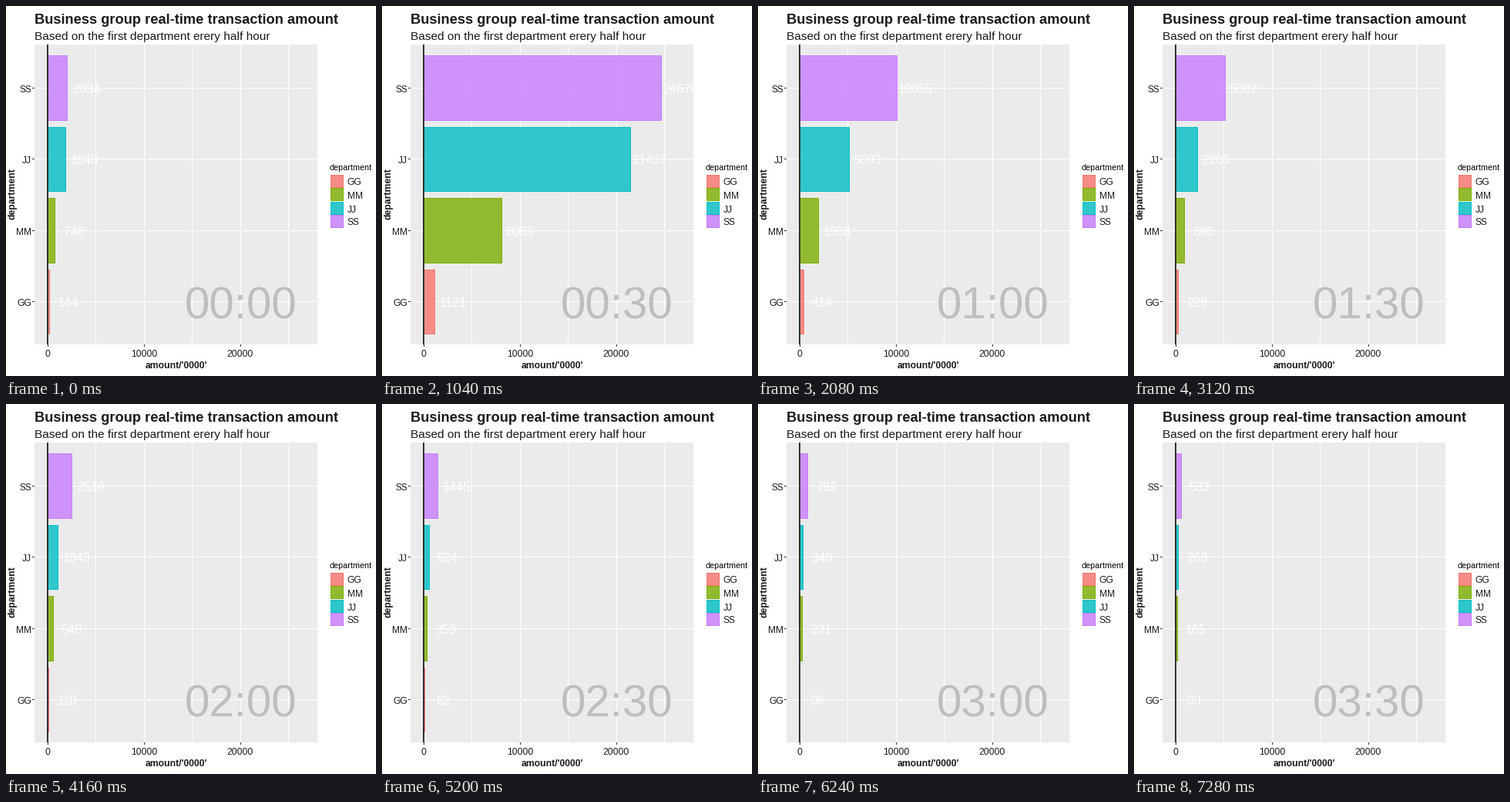
Write a matplotlib script that moves like this. It is 480 by 480 pixels and loops after 8000 ms.

```python
import matplotlib.pyplot as plt
from matplotlib.animation import FuncAnimation
from matplotlib.colors import to_rgba
from matplotlib.patches import Rectangle

SIZE = 480
STEP_MS, HOLD = 80, 13          # every half hour stays for 13 ticks
FRAMES = 100
LEFT, TOP, RIGHT, BOTTOM = 37, 50, 404, 439
ZERO, UNIT = 54, 0.0125         # pixel of value 0, pixels per value
INK = "#1a1a1a"

NAMES = ["SS", "JJ", "MM", "GG"]
COLORS = ["#C77CFF", "#00BFC4", "#7CAE00", "#F8766D"]
ROWS = [106.4, 198.9, 291.4, 383.9]
HALF_BAR = 41.65
AMOUNTS = [
    (2034, 1848, 740, 144),
    (24676, 21437, 8059, 1121),
    (10055, 5093, 1938, 414),
    (5082, 2205, 896, 226),
    (2516, 1043, 548, 110),
    (1445, 524, 359, 82),
    (792, 348, 231, 36),
    (533, 263, 165, 33),
]

plt.rcParams["font.family"] = "Liberation Sans"
fig = plt.figure(figsize=(SIZE / 72, SIZE / 72), dpi=72, facecolor="white")
ax = fig.add_axes([0, 0, 1, 1])
ax.set_xlim(0, SIZE)
ax.set_ylim(SIZE, 0)
ax.axis("off")


def box(x0, y0, x1, y1, color, z=1):
    patch = Rectangle((x0, y0), x1 - x0, y1 - y0, fc=color, lw=0, zorder=z)
    return ax.add_patch(patch)


def tile(x0, y0, x1, y1, color, z=3):
    """Translucent fill with a solid border on the given pixel rows."""
    patch = Rectangle((x0 + 0.5, y0 + 0.5), x1 - x0, y1 - y0,
                      fc=to_rgba(color, 0.8), ec=color, lw=1,
                      joinstyle="miter", snap=False, zorder=z)
    return ax.add_patch(patch)


def text(x, y, s, size, color=INK, **kw):
    kw.setdefault("va", "baseline")
    return ax.text(x, y, s, fontsize=size, color=color, **kw)


# panel, grid and axes
panel = box(LEFT, TOP, RIGHT, BOTTOM, "#EBEBEB")
for amount in range(0, 30000, 5000):
    x = int(ZERO + amount * UNIT)
    box(x, TOP, x + 1, BOTTOM, "white", z=2)
    if amount % 10000 == 0:
        box(x, BOTTOM, x + 1, BOTTOM + 3, "#333333")
        text(x, 455, str(amount), 12.2, ha="center")
for name, row in zip(NAMES, ROWS):
    y = int(row)
    box(LEFT, y, RIGHT, y + 1, "white", z=2)
    box(LEFT - 3, y, LEFT, y + 1, "#333333")
    text(33.2, row + 5.2, name, 12, ha="right")
box(ZERO - 1, TOP, ZERO + 1, BOTTOM, "#333333", z=4)

# titles
text(37, 23, "Business group real-time transaction amount", 18.2,
     weight="bold")
text(36.9, 44, "Based on the first department erery half hour", 15.4)
text(220.4, 470, "amount/'0000'", 12.1, weight="bold", ha="center")
text(12, 244, "department", 12.2, weight="bold", ha="center",
     rotation=90, rotation_mode="anchor")

# legend
text(420, 213, "department", 10.7, "black")
for i, (name, color) in enumerate(zip(NAMES[::-1], COLORS[::-1])):
    y = int(219.6 + i * 17.28)
    box(421, y, 438, y + 17, "#EBEBEB", z=2)
    tile(421, y, 437, y + 16, color)
    text(442.7, y + 13.5, name, 12)

# moving parts
bars, labels = [], []
for row, color in zip(ROWS, COLORS):
    bars.append(tile(ZERO, int(row - HALF_BAR),
                     ZERO + 1, int(row + HALF_BAR), color))
    label = text(0, row + 6.4, "", 16.2, "white", ha="center", zorder=5)
    label.set_clip_path(panel)
    labels.append(label)
clock = text(304.8, 405, "", 58.3, "#BEBEBE", ha="center", zorder=4.5)


def draw(frame):
    slot = frame // HOLD
    for bar, label, amount in zip(bars, labels, AMOUNTS[slot]):
        length = amount * UNIT
        bar.set_width(round(length))
        label.set_x(ZERO + length + 24.5)
        label.set_text(str(amount))
    clock.set_text(f"{slot // 2:02d}:{slot % 2 * 30:02d}")
    return [*bars, *labels, clock]


anim = FuncAnimation(fig, draw, frames=FRAMES, interval=STEP_MS,
                     repeat=True, repeat_delay=0)
plt.show()
```
